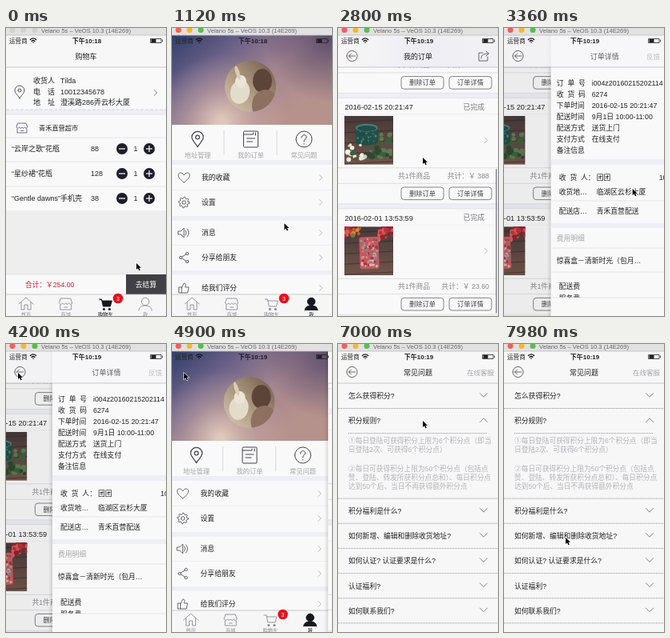
Write an HTML page with a canvas that moves like this. It is 200x360 px and loops after 8 s.

```html
<!DOCTYPE html>
<html lang="zh-CN">
<head>
<meta charset="utf-8">
<title>购物车</title>
<style>
html, body { margin: 0; width: 100%; height: 100%; overflow: hidden; background: #f7f7f9; }
canvas { display: block; width: 200px; height: 360px; }
</style>
</head>
<body>
<canvas id="stage"></canvas>
<script>
const stage = document.getElementById('stage'), dpr = window.devicePixelRatio || 1;
stage.width = 200 * dpr;
stage.height = 360 * dpr;
const c = stage.getContext('2d');
const LOOP = 8000, INK = '#222', GREY = '#8b8b8f', GAP = '#eeeef5', PAPER = '#f9f9fa', RULE = '#e0e0e5';
const FONT = '"Liberation Sans", "Noto Sans CJK SC", "Noto Sans CJK", sans-serif';

// ---- drawing helpers ----
function rect(x, y, w, h, color) {
  c.fillStyle = color;
  c.fillRect(x, y, w, h);
}
function disc(x, y, r, color) {
  c.fillStyle = color;
  c.beginPath();
  c.arc(x, y, r, 0, 7);
  c.fill();
}
function oval(x, y, rx, ry, color, angle = 0) {
  c.fillStyle = color;
  c.beginPath();
  c.ellipse(x, y, rx, ry, angle, 0, 7);
  c.fill();
}
function shade(gradient, ...colors) {
  colors.forEach((k, i) => gradient.addColorStop(i / (colors.length - 1), k));
  return gradient;
}
function text(s, x, y, size = 8.8, color = INK, align = 'left', weight = 400) {
  c.font = `${weight} ${size}px ${FONT}`;
  c.fillStyle = color;
  c.textAlign = align;
  c.fillText(s, x, y + size * .37);
}
function line(x1, y1, x2, y2, color = RULE, dash = [], width = .8) {
  c.strokeStyle = color;
  c.lineWidth = width;
  c.setLineDash(dash);
  c.beginPath();
  c.moveTo(x1, y1);
  c.lineTo(x2, y2);
  c.stroke();
  c.setLineDash([]);
}
function at(x, y, draw, angle = 0, scale = 1) {
  c.save();
  c.translate(x, y);
  c.rotate(angle);
  c.scale(scale, scale);
  draw();
  c.restore();
}
function icon(d, x, y, color = '#55555c', fill = false, width = .9, scale = 1) {
  at(x, y, () => {
    const p = new Path2D(d);
    c.strokeStyle = c.fillStyle = color;
    c.lineWidth = width;
    c.lineJoin = c.lineCap = 'round';
    if (fill) c.fill(p);
    c.stroke(p);
  }, 0, scale);
}
const ring = (r, x = 0, y = 0) => `M${x - r} ${y}a${r} ${r} 0 1 0 ${2 * r} 0a${r} ${r} 0 1 0 ${-2 * r} 0`;
const ICON = {
  pin: 'M0 8C-3 3-6 1-6-2A6 6 0 0 1 6-2C6 1 3 3 0 8' + ring(2, 0, -2),
  pad: 'M-9-9Q-9-10-8-10H8Q9-10 9-9V9Q9 10 8 10H-8Q-9 10-9 9ZM-9-6H3V-8M-5-1H5M-5 3H2M6-8V-5',
  help: ring(10) + 'M-3-2C-3-7 4-6 3-2C2 0 0 0 0 3M0 5.5V6',
  heart: 'M0 6C-4 3-7 0-7-3C-7-7-2-7 0-3C2-7 7-7 7-3C7 0 4 3 0 6',
  sound: 'M-7-2H-4L0-6V6L-4 2H-7ZM2-3Q4 0 2 3M4-5Q8 0 4 5',
  share: ring(1.7, -4, 0) + ring(1.7, 4, -5) + ring(1.7, 4, 5) + 'M-2.4-1L2.4-4M-2.4 1L2.4 4',
  thumb: 'M-6-1H-3V6H-6ZM-3 0L0-6C3-6 2-3 1.5-1H6L4.5 6H-3',
  house: 'M-9 0L0-8L9 0M-6-2V7H-2V1H2V7H6V-2',
  shop: 'M-6-7H6L8-1Q6 2 4-1Q2 2 0-1Q-2 2-4-1Q-6 2-8-1ZM-7 1V7H7V1M-2 4H2',
  cart: 'M-8-6H-5L-3 3H6L8-4H-4.5',
  person: ring(4.8, 0, -3) + 'M-8 8C-8 4-5 2 0 2S8 4 8 8',
  back: ring(6.6) + 'M4 0H-4M-1-3L-4 0L-1 3',
  send: 'M-1-4H-6V6H5V1M-3 3C-3-2 1-3 6-3M3-6L6.5-3L3 0',
  right: 'M-2-4L2 0L-2 4',
  down: 'M-4.5-2.3L0 2.3L4.5-2.3',
  up: 'M-4.5 2.3L0-2.3L4.5 2.3',
};
ICON.gear = ring(2.3) + 'M' + [...Array(32).keys()].map(i => {
  const r = i % 4 < 2 ? 6.8 : 5, a = i * Math.PI / 16;
  return `${(r * Math.cos(a)).toFixed(2)} ${(r * Math.sin(a)).toFixed(2)}`;
}).join('L') + 'Z';
const arrow = (x, y, color = '#a9a9ae') => icon(ICON.right, x, y, color, false, .9, .85);

function blobs(seed, n, x, y, w, h, r, colors) {
  const rnd = () => (seed = seed * 16807 % 2147483647) / 2147483647;
  rnd();
  for (let i = 0; i < n; i++)
    disc(x + rnd() * w, y + rnd() * h, r * (.6 + rnd() * .7), colors[i % colors.length]);
}

// ---- flat stand-ins for the product photos ----
const LEAF = ['#3d5f3c', '#5b7c50', '#2e4733'], WHITE = ['#e6e8df', '#c9cfbf', '#f3f2e6'];
const REDS = ['#b8323a', '#d95a58', '#8d2630'], LILAC = ['#6a58a6', '#8674bd', '#4c3f80'];
const ORANGE = ['#c8532f', '#d98a3a', '#7d7a3a'];
function phoneCase(x, y, angle) {
  at(x, y, () => {
    c.fillStyle = '#c25a60';
    c.beginPath();
    c.roundRect(-12, -20, 24, 40, 3);
    c.fill();
    blobs(71, 70, -10, -18, 20, 36, 1.6, ['#d98484', '#6f8d90', '#dcb0a8', '#a8323f']);
  }, angle);
}
function jar(x, y, w, h, color, rim) {
  oval(x, y + h, w / 2, 5, color);
  rect(x - w / 2, y, w, h, color);
  blobs(17, 50, x - w / 2 + 2, y + 3, w - 4, h - 1, 1.2, [rim, color]);
  oval(x, y, w / 2, 5, rim);
  oval(x, y + .7, w / 2 - 2, 3.5, color);
}
const PHOTOS = [
  () => {
    blobs(5, 26, 0, 4, 26, 24, 3, LEAF);
    blobs(8, 18, 0, 0, 22, 18, 2.6, ORANGE);
    blobs(9, 30, 36, 0, 25, 30, 2.4, LILAC.concat(LEAF));
    icon('M28 40L31 16M31 40L27 17', 0, 0, '#c5c2c0', false, 1.8);
    icon(ring(5, 25, 50) + ring(5, 35, 50) + 'M28 40L26 45M31 40L34 45', 0, 0, '#c4262f', false, 2);
  },
  () => {
    blobs(12, 18, 0, 0, 16, 16, 3, REDS.concat(LEAF));
    blobs(4, 16, 46, 0, 15, 22, 2.6, REDS);
    phoneCase(31, 32, .06);
  },
  () => {
    blobs(3, 10, 0, 0, 20, 10, 2.4, ORANGE);
    rect(19, 16, 26, 31, '#2f8a70');
    rect(20, 22, 24, 16, '#d4dccb');
    blobs(9, 8, 25, 25, 14, 9, 1.6, LEAF);
  },
  () => {
    blobs(6, 16, 0, 0, 61, 18, 4, LEAF);
    jar(33, 11, 32, 34, '#66758a', '#98a5b0');
    blobs(15, 110, 0, 36, 61, 25, 2.2, LILAC.concat(LEAF[2]));
  },
  () => {
    blobs(2, 16, 0, 6, 14, 20, 2.6, WHITE);
    jar(32, 15, 34, 33, '#3f665b', '#7d9e90');
    blobs(7, 24, 0, 42, 26, 16, 2.5, WHITE.concat(LEAF));
  },
  () => {
    blobs(18, 45, 26, 22, 32, 30, 3, LEAF);
    jar(28, 15, 28, 17, '#1f4f48', '#4a7b70');
    blobs(21, 18, 4, 34, 22, 22, 2.6, WHITE.concat(LEAF[0]));
  },
  () => {
    blobs(31, 26, 0, 0, 20, 12, 2.8, REDS.concat(ORANGE));
    blobs(33, 26, 42, 0, 19, 16, 2.8, REDS);
    phoneCase(31, 33, -.04);
  },
];
function photo(i, x, y) {
  c.save();
  c.beginPath();
  c.rect(x, y, 61, 61);
  c.clip();
  c.translate(x, y);
  rect(0, 0, 61, 61, shade(c.createLinearGradient(0, 0, 0, 61), '#46393a', '#715549'));
  for (let k = 0; k < 5; k++) line(0, 8 + k * 13, 61, 5 + k * 13, 'rgba(50,36,36,.5)', [], 1.2);
  PHOTOS[i]();
  c.restore();
}

// ---- shared chrome ----
function navBack(tint = '#f7f7f8') {
  rect(0, 0, 200, 49, tint);
  line(0, 49, 200, 49, '#b9b9bd');
}
function navItems(title, right, shift = 0) {
  text(title, 100 + shift, 36, 9, INK, 'center', 500);
  if (right) text(right, 195, 36, 8.5, '#a6a6aa', 'right');
}
function tabBar(active) {
  rect(0, 333, 200, 27, '#f6f6f7');
  line(0, 333, 200, 333, '#bdbdc2');
  [['首页', 'house'], ['商城', 'shop'], ['购物车', 'cart'], ['我', 'person']].forEach(([label, name], i) => {
    const on = i === active, color = on ? '#16161f' : '#8c8c92', x = 25 + 49.7 * i;
    icon(ICON[name], x, 345, color, on);
    if (name === 'cart') {
      disc(x - 2, 351.5, 1.6, color);
      disc(x + 5, 351.5, 1.6, color);
    }
    text(label, x, 358.5, 6.3, color, 'center');
  });
  disc(140, 338, 6.3, '#e8101c');
  text('3', 140, 338, 7, '#fff', 'center');
}
function statusBar(t) {
  text('运营商', 4, 16, 7.6);
  icon('M-3.6-1.5Q0-4.8 3.6-1.5M-2 .4Q0-1.4 2 .4M0 2V2.2', 34, 16, '#111', false, 1.3);
  text(t < 2400 ? '下午10:18' : '下午10:19', 101, 16, 8, INK, 'center', 700);
  icon('M-7-2.5H6V2.5H-7ZM7.6-1V1', 188, 16, '#222', false, .8);
  rect(181.5, 14, 6, 4, '#222');
  rect(0, 0, 200, 9, '#e2e1e2');
  line(0, 9, 200, 9, '#bcbbbd');
  ['#f0605a', '#f5b72e', '#55c04a'].forEach((k, i) => disc(8 + 14 * i, 2.5, 3.5, t < 140 ? '#d2d1d2' : k));
  text('Velano 5s – VeOS 10.3 (14E269)', 100, 2.7, 7.6, '#68686c', 'center');
}

// ---- pages ----
function cartPage() {
  rect(0, 0, 200, 360, '#eeeeef');
  rect(0, 49, 200, 181, PAPER);
  navBack();
  navItems('购物车');
  icon(ICON.pin, 17, 80, '#44444a');
  [['收货人', 'Tilda'], ['电　话', '10012345678'], ['地　址', '澄溪路286弄云杉大厦']].forEach(([k, v], i) => {
    text(k, 34, 66 + 13.5 * i, 9);
    text(v, 68, 66 + 13.5 * i, 9);
  });
  arrow(187, 81, '#55555c');
  rect(0, 102, 200, 6, GAP);
  line(0, 102, 200, 102, '#cdcddd', [4, 2]);
  line(0, 108, 200, 108);
  icon(ICON.shop, 20, 125, '#55557a', false, 1, .85);
  text('青禾直营超市', 41, 125, 8.2);
  line(0, 137, 200, 137);
  [['“云岸之歌”花瓶', 88], ['“星纱裙”花瓶', 128], ['“Gentle dawns”手机壳', 38]].forEach(([name, price], i) => {
    const y = 151 + 31 * i;
    text(name, 7, y, 9);
    text(price, 106, y, 9);
    text('1', 162, y, 9, INK, 'center');
    disc(145, y, 7, '#1d1d2c');
    disc(179, y, 7, '#1d1d2c');
    line(141, y, 149, y, '#fff', [], 1.2);
    line(175, y, 183, y, '#fff', [], 1.2);
    line(179, y - 4, 179, y + 4, '#fff', [], 1.2);
    line(0, y + 16, 200, y + 16);
  });
  rect(0, 308, 150, 25, PAPER);
  line(0, 308, 150, 308);
  text('合计：￥254.00', 24, 321, 8.7, '#d0252f');
  rect(150, 308, 50, 25, '#414145');
  text('去结算', 175, 321, 8.8, '#fff', 'center');
  tabBar(2);
}

function portrait() {
  c.save();
  c.beginPath();
  c.arc(98, 73, 32, 0, 7);
  c.clip();
  rect(66, 41, 64, 64, shade(c.createLinearGradient(70, 100, 125, 45), '#d3c3ab', '#a8947d', '#77604f'));
  oval(85, 80, 12, 15, '#e4dccb', .2);
  oval(86, 67, 7, 8, '#ece5d6');
  oval(82, 56, 2.5, 9, '#d8cdb9', -.3);
  oval(113, 66, 12, 15, '#5d4439');
  oval(117, 97, 17, 20, '#8d7060');
  c.restore();
}
function profilePage() {
  rect(0, 0, 200, 360, PAPER);
  rect(0, 9, 200, 112, shade(c.createLinearGradient(20, 0, 120, 125), '#35416c', '#6d6288', '#a3858f', '#b5928c'));
  rect(0, 9, 200, 112, shade(c.createRadialGradient(62, 118, 5, 62, 118, 85), 'rgba(232,210,192,.85)', 'rgba(205,175,170,.4)', 'rgba(205,175,170,0)'));
  rect(0, 9, 200, 112, shade(c.createRadialGradient(200, 9, 5, 200, 9, 85), 'rgba(70,60,98,.75)', 'rgba(70,60,98,0)'));
  portrait();
  [['地址管理', 'pin', 32], ['我的订单', 'pad', 98.5], ['常见问题', 'help', 165]].forEach(([label, name, x]) => {
    icon(ICON[name], x, 139, '#44444a', false, 1, name === 'pin' ? 1.2 : 1);
    text(label, x, 159, 8.3, '#a6a6aa', 'center');
  });
  line(65, 128, 65, 159, '#d4d4da');
  line(131, 128, 131, 159, '#d4d4da');
  [[165, 6], [235, 5.5], [303, 5.5]].forEach(([y, h]) => rect(0, y, 200, h, GAP));
  line(0, 202.5, 200, 202.5, '#ededf1');
  line(0, 271.5, 200, 271.5, '#ededf1');
  [['我的收藏', 'heart', 187], ['设置', 'gear', 218], ['消息', 'sound', 256], ['分享给朋友', 'share', 287], ['给我们评分', 'thumb', 325]]
    .forEach(([label, name, y]) => {
      icon(ICON[name], 15, y);
      text(label, 37, y, 8.8);
      arrow(186, y);
    });
  tabBar(3);
}

const ORDERS = [
  ['2016-03-11 14: 51: 09', 5, '348', [0, 1, 2]],
  ['2016-02-20 13:57:37', 2, '171', [3, 4]],
  ['2016-02-15 20:21:47', 1, '388', [5]],
  ['2016-02-01 13:53:59', 1, '23.60', [6]],
];
function button(label, x, y) {
  c.strokeStyle = '#77777c';
  c.lineWidth = .9;
  c.beginPath();
  c.roundRect(x, y - 7.8, 53, 15.6, 3.5);
  c.stroke();
  text(label, x + 26.5, y, 8.2, '#444', 'center');
}
function ordersPage(scroll, scrolling) {
  rect(0, 0, 200, 360, PAPER);
  ORDERS.forEach(([date, count, price, pics], i) => {
    const y = 61 + 138.4 * i - scroll;
    text(date, 8.5, y, 9.2);
    text('已完成', 183, y, 8.8, '#77777c', 'right');
    line(0, y + 9, 200, y + 9, '#ebebee');
    pics.forEach((p, k) => photo(p, 8 + 64.3 * k, y + 11));
    if (i) arrow(185, y + 41.5);
    line(0, y + 76, 200, y + 76, '#b5b5ba', [1, 1]);
    text(`共${count}件商品`, 75, y + 85.5, 8.8, GREY);
    text(`共计：￥ ${price}`, 189, y + 85.5, 8.8, GREY, 'right');
    line(0, y + 95.5, 200, y + 95.5, '#b5b5ba', [1, 1]);
    button('删除订单', 79, y + 108);
    button('订单详情', 139, y + 108);
    rect(0, y + 121, 200, 6, GAP);
    line(0, y + 121, 200, y + 121);
    line(0, y + 127, 200, y + 127);
  });
  if (scrolling) rect(197, 52 + scroll * .52, 1.8, 180, '#99999d');
  navBack(shade(c.createLinearGradient(0, 0, 200, 0), '#f8f7f6', '#eeedf3', '#f2f1f5'));
}
function ordersNav() {
  navItems('我的订单');
  icon(ICON.send, 182, 35);
}

function detailPage() {
  rect(0, 0, 200, 360, PAPER);
  [['订  单  号', 'i004z20160215202114'], ['收  货  码', '6274'], ['下单时间', '2016-02-15 20:21:47'], ['配送时间', '9月1日 10:00-11:00'],
    ['配送方式', '送货上门'], ['支付方式', '在线支付'], ['备注信息', '']].forEach(([k, v], i) => {
    text(k, 7, 68.5 + 14.1 * i);
    text(v, 51, 68.5 + 14.1 * i);
  });
  rect(0, 164, 200, 7, GAP);
  [['收  货  人：', '团团', 186.5], ['收货地…', '临湖区云杉大厦', 204.5], ['配送店…', '青禾直营配送', 229]].forEach(([k, v, y]) => {
    text(k, 10, y);
    text(v, 57, y);
  });
  text('10012345678', 135, 186.5);
  line(0, 216, 200, 216);
  rect(0, 244, 200, 6, GAP);
  text('费用明细', 7, 263, 8.8, '#a6a6aa');
  line(0, 275, 200, 275);
  text('惊喜盒－清新时光（包月…', 7, 290.5);
  line(0, 305, 200, 305);
  text('配送费', 10, 322.5);
  text('服务费', 10, 338);
  rect(0, 337, 200, 23, PAPER);
  line(0, 337, 200, 337);
}

const QUESTIONS = ['怎么获得积分?', '积分规则?', '积分福利是什么?', '如何新增、编辑和删除收货地址?', '如何认证? 认证要求是什么?',
  '认证福利?', '如何联系我们?', '关于我们', '免责声明'];
const ANSWER = [
  ['①每日登陆可获得积分上限为6个积分点（即当', 121], ['日登陆2次、可获得6个积分点）', 132],
  ['②每日可获得积分上限为50个积分点（包括点', 156], ['赞、登陆、转发所获积分点总和）、每日积分点', 167],
  ['达到50个后、当日不再获得额外积分点', 178],
];
function faqPage(open) {
  rect(0, 0, 200, 360, '#f7f7f8');
  const drop = 81.5 * open;
  if (open > 0) {
    c.save();
    c.beginPath();
    c.rect(0, 111, 200, drop);
    c.clip();
    ANSWER.forEach(([s, y]) => text(s, 13, y, 8.7, '#b4b4b8'));
    c.restore();
  }
  QUESTIONS.forEach((q, i) => {
    const y = 65 + 31.15 * i + (i > 1 ? drop : 0), inset = i === 1 && open ? 13 : 0;
    text(q, 13, y);
    icon(i === 1 && open > .5 ? ICON.up : ICON.down, 182, y - 1, '#77777c');
    line(inset, y + 15.5, 200 - inset, y + 15.5, '#77777c', [1, 1]);
  });
  if (open) line(0, 111.6 + drop, 200, 111.6 + drop, '#77777c', [1, 1]);
  navBack();
  navItems('常见问题', '在线客服');
  icon(ICON.back, 17.5, 35);
}

// ---- motion ----
const clamp = v => Math.min(1, Math.max(0, v));
const ease = (t, start, length) => 1 - (1 - clamp((t - start) / length)) ** 3;
const smooth = u => u * u * (3 - 2 * u);
// time, x, y of the pointer tip
const PATH = [[0, 163, 294], [300, 163, 294], [720, 174, 343], [900, 174, 343], [1350, 105, 140], [1820, 105, 140], [2000, 106, 165],
  [2800, 106, 162], [3080, 165, 206], [3300, 165, 206], [3900, 15, 36], [4900, 15, 36], [5380, 165, 143], [5600, 165, 143],
  [6100, 102, 79], [6350, 102, 79], [6550, 106, 96], [7000, 106, 96], [7900, 77, 242], [8000, 77, 242]];
function cursor(t) {
  const i = PATH.findIndex(p => p[0] > t), [t0, x0, y0] = PATH[i - 1], [t1, x1, y1] = PATH[i];
  const u = smooth((t - t0) / (t1 - t0));
  at(x0 + (x1 - x0) * u, y0 + (y1 - y0) * u, () => {
    const p = new Path2D('M0 0V10L2.4 7.8L4.2 11.6L6 10.8L4.3 7.2H7.4Z');
    c.lineWidth = 1.4;
    c.strokeStyle = '#fff';
    c.stroke(p);
    c.fillStyle = '#000';
    c.fill(p);
  }, 0, .8);
}
// p is how far the upper page has slid in
function slide(p, under, over) {
  if (p < 1) {
    at(-60 * p, 0, under);
    rect(0, 0, 200, 360, `rgba(0,0,0,${.07 * p})`);
  }
  if (p > 0) {
    const x = 200 * (1 - p);
    if (p < 1) rect(x - 5, 0, 5, 360, shade(c.createLinearGradient(x - 5, 0, x, 0), 'rgba(0,0,0,0)', 'rgba(0,0,0,.12)'));
    at(x, 0, over);
  }
}
function orderStack(t) {
  const p = ease(t, 3200, 480) - ease(t, 4160, 380);
  const scroll = 239 * smooth(clamp((t - 1960) / 680));
  slide(p, () => ordersPage(scroll, t > 1960 && t < 3150), detailPage);
  if (p > 0) {
    rect(0, 9, 200, 40, 'rgba(247,247,248,.75)');
    line(0, 49, 200, 49, '#b9b9bd');
  }
  c.globalAlpha = clamp(1 - 2 * p);
  ordersNav();
  c.globalAlpha = p;
  navItems('订单详情', '反馈', 88 * (1 - p));
  c.globalAlpha = 1;
  icon(ICON.back, 17.5, 35);
}
function draw(t) {
  c.setTransform(dpr, 0, 0, dpr, 0, 0);
  if (t < 840) cartPage();
  else if (t < 5300) slide(ease(t, 1480, 500) - ease(t, 4560, 480), profilePage, () => orderStack(t));
  else slide(ease(t, 5500, 500), profilePage, () => faqPage(ease(t, 6650, 300)));
  statusBar(t);
  cursor(t);
}
const began = performance.now();
function tick() {
  draw((performance.now() - began) % LOOP);
  requestAnimationFrame(tick);
}
tick();
</script>
</body>
</html>
```
